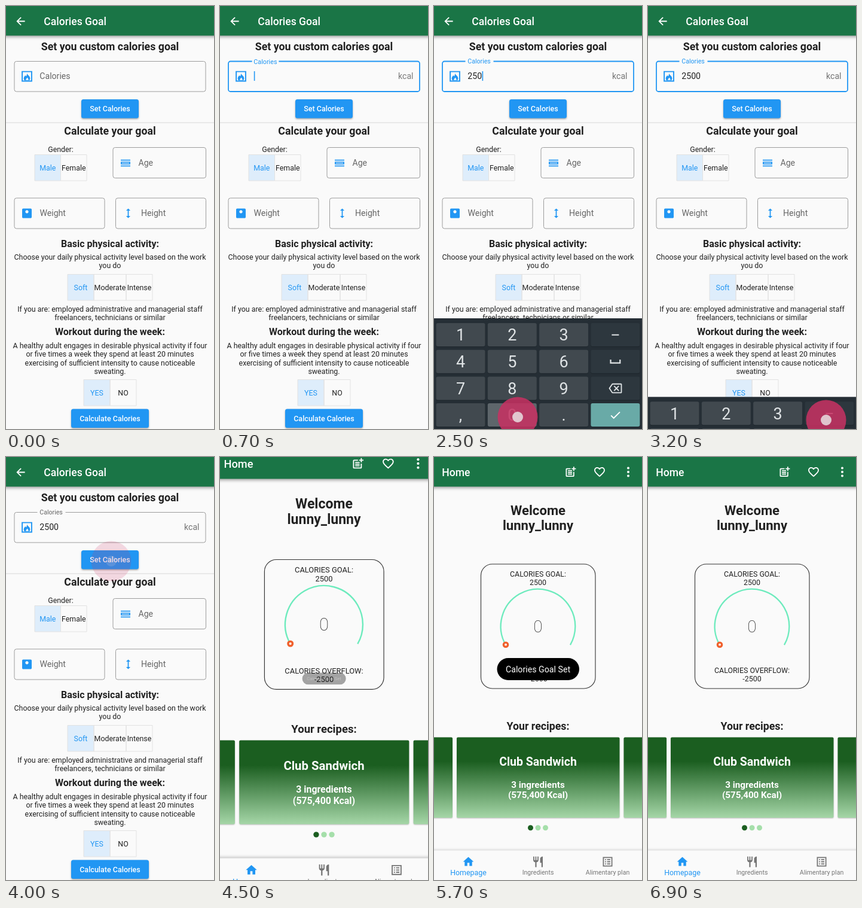
These frames come from a looping animation (348 px wide and 707 px high, 7 s). An HTML page with a canvas:

```html
<!DOCTYPE html>
<html lang="en">
<head>
<meta charset="utf-8">
<title>Calories goal</title>
<style>
html, body { margin: 0; width: 100%; height: 100%; overflow: hidden; background: #fafafa; }
canvas { display: block; width: 348px; height: 707px; }
</style>
</head>
<body>
<canvas id="stage"></canvas>
<script>
const W = 348, H = 707, LOOP = 7000, STEP = 100;
const BLUE = '#2196f3', GREEN = '#1a7546', INK = '#212121', PAPER = '#fafafa', GRAY = '#757575';
const canvas = document.getElementById('stage');
const ctx = canvas.getContext('2d');
const ratio = window.devicePixelRatio || 1;
canvas.width = W * ratio;
canvas.height = H * ratio;

const ICONS = {
  back: 'M20 11H7.83l5.59-5.59L12 4l-8 8 8 8 1.41-1.41L7.83 13H20z',
  frame: 'M2 2h20v20H2zM4.2 4.2v15.6h15.6V4.2z',
  flame: 'M12 6c1 4 6 5 6 10 0 1.500-.5 2.600-1.500 3.800h-9C6.500 18.600 6 17.500 6 16c0-3 2-4 3-6 .5 1 1 1.500 1.500 2 1.200-1.500 1.800-3.500 1.500-6zM13 14c-1 2-3 2.500-3 5h5c0-2-1.500-3-2-5z',
  days: 'M3 17h18v2H3zm16-5v1H5v-1h14m2-2H3v5h18v-5zM3 6h18v2H3z',
  scale: 'M19 3H5C3.900 3 3 3.900 3 5v14c0 1.100.9 2 2 2h14c1.100 0 2-.9 2-2V5c0-1.100-.9-2-2-2zM12 12c-1.660 0-3-1.340-3-3s1.340-3 3-3 3 1.340 3 3-1.340 3-3 3z',
  height: 'M13 7h3L12 3 8 7h3v10H8l4 4 4-4h-3z',
  heart: 'M16.5 3c-1.740 0-3.410.81-4.500 2.090C10.910 3.810 9.240 3 7.500 3 4.420 3 2 5.420 2 8.500c0 3.780 3.400 6.860 8.550 11.540L12 21.350l1.450-1.320C18.600 15.360 22 12.280 22 8.500 22 5.420 19.580 3 16.500 3zM12 18.650C7.140 14.240 4 11.390 4 8.500 4 6.500 5.500 5 7.500 5c1.540 0 3.040.99 3.570 2.360h1.870C13.460 5.990 14.960 5 16.500 5c2 0 3.500 1.500 3.500 3.500 0 2.890-3.140 5.740-8 10.150z',
  addNote: 'M17 19H5V7h7V5H5c-1.100 0-2 .9-2 2v12c0 1.100.9 2 2 2h12c1.100 0 2-.9 2-2v-7h-2zM19 2h-2v3h-3v2h3v3h2V7h3V5h-3zM7 9h8v2H7zM7 12h8v2H7zM7 15h8v2H7z',
  home: 'M10 20v-6h4v6h5v-8h3L12 3 2 12h3v8z',
  cutlery: 'M11 9H9V2H7v7H5V2H3v7c0 2.120 1.660 3.840 3.750 3.970V22h2.500v-9.030C11.340 12.840 13 11.120 13 9V2h-2zm5-3v8h2.500v8H21V2c-2.760 0-5 2.240-5 4z',
  list: 'M3 3h18v18H3zM5 5v14h14V5zM11 7h6v2h-6zM11 11h6v2h-6zM11 15h6v2h-6zM7 7h2v2H7zM7 11h2v2H7zM7 15h2v2H7z',
  erase: 'M22 3H7c-.69 0-1.230.35-1.590.88L0 12l5.410 8.110c.36.53.9.89 1.590.89h15c1.100 0 2-.9 2-2V5c0-1.100-.9-2-2-2zM22 19H7.070L2.400 12l4.660-7H22zM10.410 17L14 13.410 17.590 17 19 15.590 15.410 12 19 8.410 17.590 7 14 10.590 10.410 7 9 8.410 12.590 12 9 15.590z',
  space: 'M18 9v4H6V9H4v6h16V9z',
  check: 'M9 16.170L4.830 12l-1.420 1.410L9 19 21 7l-1.410-1.410z'
};
for (const name in ICONS) ICONS[name] = new Path2D(ICONS[name]);

// Each tap: start, end, x, y and the keyboard key it presses, if any.
const TAPS = [
  { from: 420, to: 680, x: 150, y: 118 },
  { from: 1320, to: 1580, x: 134.5, y: 550, key: 1 },
  { from: 1820, to: 2080, x: 135, y: 595, key: 5 },
  { from: 2380, to: 2620, x: 140, y: 687, key: 13 },
  { from: 2700, to: 2920, x: 140, y: 687, key: 13 },
  { from: 3000, to: 3320, x: 298, y: 692, key: 15 },
  { from: 3980, to: 4400, x: 176, y: 174 }
];
const TYPED = [[1400, '2'], [1900, '25'], [2450, '250'], [2800, '2500']];
const KEYS = ['1', '2', '3', 'minus', '4', '5', '6', 'space', '7', '8', '9', 'erase', ',', '0', '.', 'check'];

const ramp = (t, from, span) => Math.min(1, Math.max(0, (t - from) / span));
const easeOut = (p, power) => 1 - Math.pow(1 - p, power);
const easeInOut = p => p < 0.5 ? 4 * p ** 3 : 1 - 4 * (1 - p) ** 3;
const mix = (a, b, p) => a + (b - a) * p;

// y is the middle of the capital letters.
function text(str, x, y, size, color = INK, weight = 400, align = 'center') {
  ctx.font = `${weight} ${size}px Roboto, sans-serif`;
  ctx.textAlign = align;
  ctx.fillStyle = color;
  ctx.fillText(str, x, y + size * 0.355);
}

function box(x, y, w, h, r, fill, stroke, line = 1) {
  ctx.beginPath();
  ctx.roundRect(x, y, w, h, r);
  if (fill) { ctx.fillStyle = fill; ctx.fill(); }
  if (stroke) { ctx.strokeStyle = stroke; ctx.lineWidth = line; ctx.stroke(); }
}

function disc(x, y, r, fill) {
  ctx.beginPath();
  ctx.arc(x, y, r, 0, Math.PI * 2);
  ctx.fillStyle = fill;
  ctx.fill();
}

function icon(name, x, y, color, size = 21.3) {
  ctx.save();
  ctx.translate(x - size / 2, y - size / 2);
  ctx.scale(size / 24, size / 24);
  ctx.fillStyle = color;
  ctx.fill(ICONS[name], 'evenodd');
  ctx.restore();
}

function scaled(s, alpha, x, y, draw) {
  ctx.save();
  ctx.globalAlpha = alpha;
  ctx.translate(x, y);
  ctx.scale(s, s);
  ctx.translate(-x, -y);
  draw();
  ctx.restore();
}

function shadow(blur, dy, alpha) {
  ctx.shadowColor = `rgba(0,0,0,${alpha})`;
  ctx.shadowBlur = blur * ratio;
  ctx.shadowOffsetY = dy * ratio;
}

function page() {
  ctx.fillStyle = PAPER;
  ctx.fillRect(0, 0, W, H);
}

function appBar(title, x) {
  ctx.save();
  shadow(5, 2, 0.35);
  ctx.fillStyle = GREEN;
  ctx.fillRect(-10, -20, W + 20, 69.5);
  ctx.restore();
  text(title, x, 26, 17.5, '#fff', 500, 'left');
}

function button(label, x, y, w, h, lit) {
  ctx.save();
  shadow(3, 1.5, 0.35);
  box(x, y, w, h, 3.5, BLUE);
  ctx.restore();
  if (lit) box(x, y, w, h, 3.5, `rgba(255,255,255,${0.22 * lit})`);
  text(label, x + w / 2, y + h / 2, 12.5, '#fff', 500);
}

function field(name, label, x, y, w) {
  box(x, y, w, 51, 3.5, null, '#9c9c9c', 1);
  icon(name, x + 21, y + 25.5, BLUE);
  text(label, x + 42.5, y + 25, 14.1, '#666', 400, 'left');
}

function toggles(labels, edges, y) {
  labels.forEach((label, i) => {
    const x = edges[i], w = edges[i + 1] - x;
    box(x, y, w, 43.5, 0, i ? null : '#deedfb', '#e2e2e2');
    text(label, x + w / 2, y + 22, 12.4, i ? INK : BLUE);
  });
}

function calorieField(t) {
  const float = easeOut(ramp(t, 560, 180), 2);
  const focused = t >= 600 && t < 3300;
  const tint = focused ? BLUE : float ? '#666' : '#9c9c9c';
  box(14, 92.5, 320, 50.5, 3.5, null, focused ? BLUE : '#9c9c9c', focused ? 1.8 : 1);
  if (float) {
    ctx.fillStyle = PAPER;
    ctx.fillRect(mix(76, 52.5, float), 90, 47 * float, 5);
  }
  icon('frame', 35, 117.5, BLUE);
  icon('flame', 35, 117.5, BLUE);
  text('Calories', 56.3, mix(117, 92, float), mix(14.1, 10.6, float), float ? tint : '#666', 400, 'left');
  if (!float) return;
  ctx.globalAlpha *= float;
  text('kcal', 323.5, 117, 14.1, '#757575', 400, 'right');
  ctx.globalAlpha /= float;
  let value = '';
  for (const [at, str] of TYPED) if (t >= at) value = str;
  text(value, 56.3, 117, 14.1, INK, 400, 'left');
  if (focused && t < 3100) {
    ctx.fillStyle = BLUE;
    ctx.fillRect(56.8 + ctx.measureText(value).width, 109, 1.6, 16);
  }
}

function goalPage(t) {
  page();
  text('Set you custom calories goal', 174, 68, 17.75, INK, 700);
  calorieField(t);
  const press = ramp(t, 4000, 150);
  button('Set Calories', 126, 156, 96, 31.5, press);
  ctx.fillStyle = '#d8d8d8';
  ctx.fillRect(0, 194.5, W, 1);
  text('Calculate your goal', 174, 209, 17.75, INK, 700);
  text('Gender:', 91.5, 239.5, 12.4);
  toggles(['Male', 'Female'], [48, 91.5, 135], 248.5);
  field('days', 'Age', 179, 236.5, 155.5);
  field('scale', 'Weight', 14, 321, 151);
  field('height', 'Height', 183.5, 321, 151);
  text('Basic physical activity:', 174, 397, 16, INK, 700);
  text('Choose your daily physical activity level based on the work', 174, 420, 12.42);
  text('you do', 174, 434, 12.42);
  toggles(['Soft', 'Moderate', 'Intense'], [103, 147, 201, 245], 448.5);
  text('If you are: employed administrative and managerial staff', 174, 506.5, 12.42);
  text('freelancers, technicians or similar', 174, 520.5, 12.42);
  text('Workout during the week:', 174, 544.5, 16, INK, 700);
  ['A healthy adult engages in desirable physical activity if four',
    'or five times a week they spend at least 20 minutes',
    'exercising of sufficient intensity to cause noticeable',
    'sweating.'].forEach((line, i) => text(line, 174, 567.5 + 14.3 * i, 12.42));
  toggles(['YES', 'NO'], [130, 174, 218], 624.5);
  button('Calculate Calories', 109, 673.5, 130, 31.5, 0);
  appBar('Calories Goal', 63.3);
  icon('back', 24.5, 25.5, '#fff');
}

function keyboard(t) {
  const up = easeOut(ramp(t, 700, 280), 2) - easeOut(ramp(t, 3080, 260), 2);
  if (up <= 0) return;
  const pressed = TAPS.find(tap => t >= tap.from && t < tap.to);
  ctx.save();
  ctx.translate(0, 185 * (1 - up));
  ctx.fillStyle = '#252e35';
  ctx.fillRect(0, 522, W, 185);
  KEYS.forEach((key, i) => {
    const col = i % 4, x = 3.5 + 86.3 * col, y = 530 + 44.7 * (i >> 2);
    const cx = x + 41, cy = y + 19.7;
    const lit = pressed && pressed.key === i && key !== 'check';
    box(x, y + 1, 82, 39, 3, '#1d252b');
    box(x, y, 82, 39, 3, key === 'check' ? '#69aaa7' : lit ? '#5e666b' : col === 3 ? '#2d373e' : '#41494f');
    if (key === 'minus') {
      ctx.fillStyle = '#dfe3e5';
      ctx.fillRect(cx - 6, cy - 1, 12, 2);
    } else if (ICONS[key]) {
      icon(key, cx, cy, key === 'check' ? '#fff' : '#dfe3e5', key === 'space' ? 27 : 22);
    } else {
      text(key, cx, cy, 27, '#dfe3e5');
    }
  });
  ctx.restore();
}

function touches(t) {
  for (const { from, to, x, y } of TAPS) {
    const alpha = Math.min(ramp(t, from, 100), ramp(-t, -to, 100));
    if (!alpha) continue;
    disc(x, y, 33.5, `rgba(200,50,98,${0.86 * alpha})`);
    disc(x, y, 9, `rgba(232,222,224,${0.85 * alpha})`);
  }
}

function recipeCard(x, w) {
  const fill = ctx.createLinearGradient(0, 468, 0, 603);
  fill.addColorStop(0, '#1b5e20');
  fill.addColorStop(0.3, '#1b5e20');
  fill.addColorStop(1, '#a5d6a7');
  ctx.save();
  shadow(2, 1, 0.25);
  box(x, 468.5, w, 134.5, 2, fill);
  ctx.restore();
}

function gauge() {
  box(78.5, 179, 191.5, 208, 19, PAPER, '#333', 1.1);
  text('CALORIES GOAL:', 174, 195.5, 12.4);
  text('2500', 174, 209.5, 12.4);
  ctx.beginPath();
  ctx.arc(174, 283, 62.3, Math.PI * 5 / 6, Math.PI * 13 / 6);
  ctx.lineWidth = 2.3;
  ctx.strokeStyle = '#6debbd';
  ctx.stroke();
  disc(120, 313.7, 5.3, '#f0602c');
  disc(120, 313.7, 1.9, '#fff');
  text('0', 174, 283, 28, INK, 100);
  text('CALORIES OVERFLOW:', 174, 357, 12.4);
  text('-2500', 174, 370.5, 12.4);
}

function navItem(name, label, x, size, color) {
  icon(name, x, 676.5, color);
  text(label, x, 694.5, size, color);
}

function homePage() {
  page();
  text('Welcome', 174, 89, 22.1, INK, 700);
  text('lunny_lunny', 174, 114.5, 22.1, INK, 700);
  gauge();
  text('Your recipes:', 174, 450, 17.75, INK, 700);
  recipeCard(-40, 71);
  recipeCard(38, 272.5);
  recipeCard(317.5, 70);
  text('Club Sandwich', 174, 509, 19.5, '#fff', 700);
  text('3 ingredients', 174, 547.5, 15.2, '#fff', 700);
  text('(575,400 Kcal)', 174, 565, 15.2, '#fff', 700);
  [161.5, 174, 186.5].forEach((x, i) => disc(x, 619.7, 4.5, i ? '#a5dfaa' : '#1b5e20'));
  ctx.save();
  shadow(5, -1, 0.25);
  ctx.fillStyle = PAPER;
  ctx.fillRect(-10, 657.5, W + 20, 80);
  ctx.restore();
  navItem('home', 'Homepage', 57.5, 12.4, BLUE);
  navItem('cutlery', 'Ingredients', 174, 10.6, GRAY);
  navItem('list', 'Alimentary plan', 290.5, 10.6, GRAY);
  appBar('Home', 13.3);
  icon('addNote', 228.5, 25, '#fff');
  icon('heart', 277, 25, '#fff');
  for (const y of [18.5, 25, 31.5]) disc(325, y, 2, '#fff');
}

function toast(t) {
  const enter = ramp(t, 4440, 240), leave = ramp(t, 6480, 300);
  const alpha = Math.min(1, enter * 1.4) * (1 - leave);
  if (!alpha) return;
  const e = easeInOut(enter);
  ctx.save();
  ctx.translate(0, 17 * (1 - e));
  scaled(mix(0.5, 1, e) * mix(1, 0.88, leave), alpha, 174, 354.5, () => {
    box(105.5, 336, 137.5, 37, 18.5, '#000');
    text('Calories Goal Set', 174, 355, 14.2, '#fff');
  });
  ctx.restore();
}

function draw(t) {
  ctx.setTransform(ratio, 0, 0, ratio, 0, 0);
  const pop = ramp(t, 4426, 300);
  if (pop > 0) scaled(1 + 0.1 * (1 - easeOut(pop, 3)), 1, 174, 353.5, homePage);
  const fade = 1 - ramp(t, 4426, 60);
  if (fade > 0) {
    scaled(1 - 0.1 * pop, fade, 174, 353.5, () => goalPage(t));
    keyboard(t);
  }
  touches(t);
  toast(t);
}

function tick() {
  const t = performance.now() % LOOP;
  draw(Math.floor(t / STEP) * STEP);
  requestAnimationFrame(tick);
}
tick();
</script>
</body>
</html>
```
